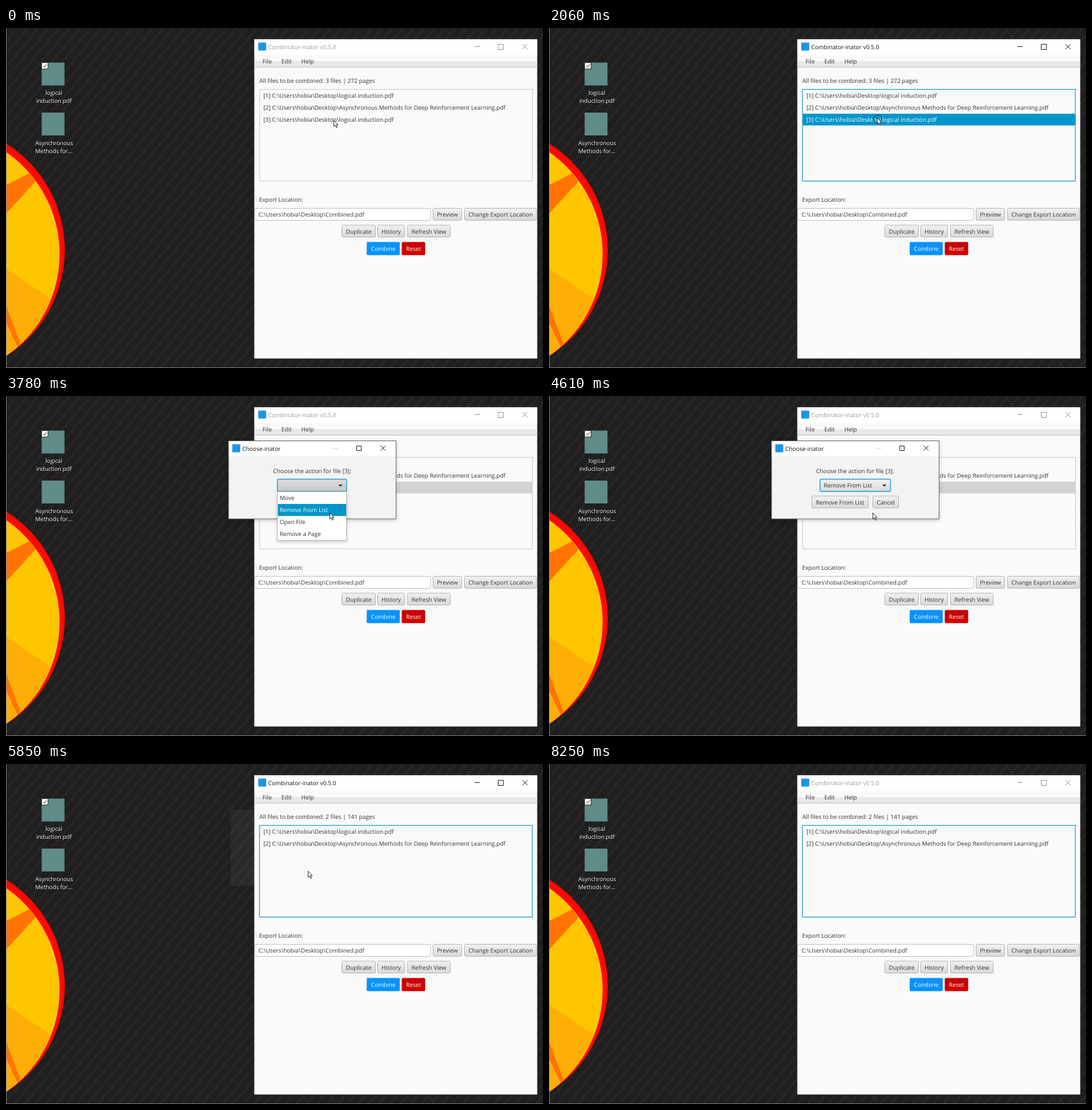
Animation of 941x595 px, one loop 8.35 s. Source, as an HTML page:

```html
<!DOCTYPE html>
<html lang="en">
<head>
<meta charset="utf-8">
<title>File list demo</title>
<style>
  html, body { margin: 0; width: 100%; height: 100%; overflow: hidden; background: #221f20; }
  svg { display: block; width: 941px; height: 595px; }
  text {
    font: 10.2px "Open Sans", "Noto Sans", sans-serif;
    fill: #333; white-space: pre; text-rendering: geometricPrecision;
  }
  .mid { text-anchor: middle; }
  .label { font-size: 10px; fill: #fff; text-anchor: middle; text-shadow: 1px 1px 1px #000; }
  .light { fill: #fff; }
  .line { fill: none; stroke-width: 1; }
  .focus { stroke: #1f9fcf; }
</style>
</head>
<body>
<svg viewBox="0 0 941 595">
  <defs>
    <pattern id="stripes" width="14" height="14" patternUnits="userSpaceOnUse" patternTransform="rotate(40)">
      <rect width="14" height="14" fill="#211e1f"/>
      <rect width="3" height="14" fill="#292627"/>
    </pattern>
    <linearGradient id="face" x2="0" y2="1">
      <stop offset="0" stop-color="#f1f1f1"/><stop offset="1" stop-color="#d9d9d9"/>
    </linearGradient>
    <linearGradient id="pressed" x2="0" y2="1">
      <stop offset="0" stop-color="#dcdcdc"/><stop offset="1" stop-color="#c8c8c8"/>
    </linearGradient>
    <linearGradient id="rule">
      <stop offset="0" stop-color="#ececec" stop-opacity="0"/><stop offset=".5" stop-color="#ececec"/>
      <stop offset="1" stop-color="#ececec" stop-opacity="0"/>
    </linearGradient>
    <filter id="shadow" x="-20%" y="-20%" width="140%" height="140%">
      <feDropShadow dx="0" dy="2" stdDeviation="3" flood-opacity=".22"/>
    </filter>
    <clipPath id="disc"><circle cx="-122.5" cy="395.5" r="216.5"/></clipPath>
  </defs>

  <g id="desktop">
    <rect width="941" height="595" fill="url(#stripes)"/>
    <path class="line" stroke="#353233" d="M404 0L436 40M520 0L536 20M562 0L578 20M770 0L784 20M800 0L814 20M520 579L532 595M566 579L578 595M740 579L752 595M824 579L836 595M890 579L902 595"/>
    <circle cx="-116.4" cy="388" r="219.4" fill="#fe0800"/>
    <g clip-path="url(#disc)">
      <rect y="170" width="110" height="410" fill="#ffc600"/>
      <path fill="#ff7400" d="M0 275L41 254L52 268L0 325Z"/>
      <path fill="#ffae05" d="M0 421L95 485V590H0Z"/>
      <path fill="#ff7400" d="M0 485L27 557L22 562L0 515Z"/>
    </g>
    <path class="line" stroke="#858585" d="M.5 0V594.5H941"/>
    <g fill="#5f8b89"><rect x="62.5" y="60.5" width="40" height="40"/><rect x="62.5" y="148" width="40" height="40"/></g>
    <rect x="62.5" y="60.5" width="11" height="11" fill="#fff" stroke="#333"/>
    <path class="line" stroke="#222" d="M65 66L67.3 68.5L71.5 63.5"/>
    <text class="label" x="84" y="117">logical</text>
    <text class="label" x="84" y="131">induction.pdf</text>
    <text class="label" x="84.5" y="205">Asynchronous</text>
    <text class="label" x="84" y="219">Methods for...</text>
  </g>

  <g id="main">
    <rect x="435" y="19.5" width="496" height="559" fill="#fafafa" stroke="#6d6d6d" stroke-width=".7"/>
    <rect x="435.5" y="20" width="495" height="27" fill="#fff"/>
    <rect x="435.5" y="58" width="495" height="10" fill="#e8e8e8"/>
    <path class="line" stroke="#bdbdbd" d="M435.5 68.5H930.5"/>
    <rect x="442" y="25.5" width="14" height="14" rx="1" fill="#1e96e6"/>
    <g data-on="0-150,2180-5850,8250-8350">
      <text x="459.5" y="37" style="fill:#999">Combinator-inator v0.5.0</text>
      <path class="line" stroke="#8f8f8f" d="M821 32.5H830M862.5 28.5H871.5V37.5H862.5ZM905 28.5L914 37M914 28.5L905 37"/>
    </g>
    <g data-on="150-2180,5850-8250">
      <text x="459.5" y="37" style="fill:#111">Combinator-inator v0.5.0</text>
      <path class="line" stroke="#111" d="M821 32.5H830M862.5 28.5H871.5V37.5H862.5ZM905 28.5L914 37M914 28.5L905 37"/>
    </g>
    <text x="449.5" y="62">File</text><text x="482.5" y="62">Edit</text><text x="517.5" y="62">Help</text>
    <text x="444" y="96" data-on="0-5850">All files to be combined: 3 files | 272 pages</text>
    <text x="444" y="96" data-on="5850-8350">All files to be combined: 2 files | 141 pages</text>

    <rect class="line" x="444.5" y="107.5" width="478" height="160" stroke="#c6c6c6"/>
    <rect x="444.5" y="150" width="478" height="20.5" fill="#0096c9" data-on="150-2180"/>
    <rect x="445" y="150" width="477" height="20.5" fill="#d3d3d3" data-on="2180-5850"/>
    <rect class="line focus" x="444.25" y="107.5" width="478" height="160.5" style="stroke-width:1.3" data-on="150-2180,5850-8350"/>
    <text x="451" y="122">[1] C:\Users\hobia\Desktop\logical induction.pdf</text>
    <text x="451" y="143">[2] C:\Users\hobia\Desktop\Asynchronous Methods for Deep Reinforcement Learning.pdf</text>
    <text x="451" y="164" data-on="0-150,2180-5850">[3] C:\Users\hobia\Desktop\logical induction.pdf</text>
    <text x="451" y="164" class="light" data-on="150-2180">[3] C:\Users\hobia\Desktop\logical induction.pdf</text>

    <text x="443.5" y="304">Export Location:</text>
    <rect x="436" y="315.5" width="308" height="21" rx="2" fill="#fff" stroke="#bcbcbc"/>
    <text x="442.5" y="330">C:\Users\hobia\Desktop\Combined.pdf</text>
    <g data-button="748,315,51,22,Preview"></g>
    <g data-button="803,315,127.5,22,Change Export Location"></g>
    <g data-button="588,344.5,60,22,Duplicate"></g>
    <g data-button="651,344.5,48,22,History"></g>
    <g data-button="703,344.5,76,22,Refresh View"></g>
    <rect x="535" y="370" width="295" height="1" fill="url(#rule)"/>
    <rect x="632" y="374.5" width="58" height="23" rx="2" fill="#0892ff"/>
    <text class="mid light" x="661" y="389.7">Combine</text>
    <rect x="693.5" y="374.5" width="41" height="23" rx="2" fill="#cb0000"/>
    <text class="mid light" x="714" y="389.7">Reset</text>
  </g>

  <rect x="394" y="80" width="41" height="133" fill="#fff" opacity=".05" data-on="5850-6000"/>

  <g id="dialog" data-on="2180-5850">
    <rect x="390" y="78.5" width="293.5" height="136.5" fill="#f3f3f3" stroke="#626262" filter="url(#shadow)"/>
    <rect x="390.5" y="79" width="292.5" height="26" fill="#fff"/>
    <rect x="396.5" y="84.5" width="14" height="14" rx="1" fill="#1e96e6"/>
    <text x="414" y="95.5" style="fill:#111">Choose-inator</text>
    <path class="line" stroke="#ccc" d="M573 91.5H582"/>
    <path class="line" stroke="#111" d="M614.5 87.5H622.5V95.5H614.5ZM656.5 87L665 95.5M665 87L656.5 95.5"/>
    <g data-on="2330-5850">
      <text class="mid" x="536.5" y="134.5">Choose the action for file [3]:</text>
      <g data-on="2330-4490">
        <rect x="475.5" y="145.5" width="121.5" height="21.5" rx="2" fill="url(#face)" data-on="2330-2840"/>
        <rect x="475.5" y="145.5" width="121.5" height="21.5" rx="2" fill="url(#pressed)" data-on="2840-4490"/>
        <rect class="line focus" x="475.5" y="145.5" width="121.5" height="21.5" rx="2" style="stroke-width:1.4"/>
        <path fill="#333" d="M582.5 155H590L586.2 158.8Z"/>
        <g opacity=".4"><g data-button="485,174.5,50,22,Choose"></g></g>
        <g data-button="542,174.5,46.5,22,Cancel"></g>
      </g>
      <g data-on="4490-5850">
        <rect x="475" y="145.5" width="123.5" height="21.5" rx="2" fill="url(#face)" stroke="#b2b2b2"/>
        <rect class="line focus" x="475" y="145.5" width="123.5" height="21.5" rx="2" style="stroke-width:1.4" data-on="4490-5700"/>
        <text x="481.5" y="160">Remove From List</text>
        <path fill="#333" d="M584 155H591.5L587.7 158.8Z"/>
        <g data-button="460,174.5,100,22,Remove From List"></g>
        <g data-on="5700-5850">
          <rect x="460" y="175" width="99.5" height="21.5" rx="2" fill="url(#pressed)"/>
          <rect class="line focus" x="460" y="175" width="99.5" height="21.5" rx="2" style="stroke-width:1.4"/>
          <text class="mid" x="509.7" y="189.5">Remove From List</text>
        </g>
        <g data-button="567,174.5,46,22,Cancel"></g>
      </g>
    </g>
  </g>

  <g id="menu" data-on="2840-4490">
    <rect x="476" y="167.5" width="120.5" height="85" fill="#fff" stroke="#b9b9b9" filter="url(#shadow)"/>
    <g data-item="0,3360-3630,Move"></g>
    <g data-item="1,3630-4490,Remove From List"></g>
    <g data-item="2,,Open File"></g>
    <g data-item="3,,Remove a Page"></g>
  </g>

  <g data-on="0-7970">
    <g id="cursor">
      <circle class="line" cx=".8" cy="2.4" r="7.2" stroke="#222" data-on="150-270,2060-2180,2600-2840,4370-4490,5700-5850"/>
      <path fill="#fff" stroke="#111" stroke-width=".9" d="M.5 .5V11.2L2.9 8.9L4.8 13.3L6.6 12.5L4.7 8.3H8Z"/>
    </g>
  </g>
</svg>
<script>
  const LOOP = 8350;
  const NS = 'http://www.w3.org/2000/svg';

  function add(parent, tag, attrs, text = '') {
    const el = document.createElementNS(NS, tag);
    for (const key in attrs) el.setAttribute(key, attrs[key]);
    el.textContent = text;
    return parent.appendChild(el);
  }

  // Hold each value from its time until the next one.
  function hold(el, keys) {
    const frames = keys.map(([t, props]) => ({ ...props, offset: t / LOOP, easing: 'step-end' }));
    frames.push({ ...keys[keys.length - 1][1], offset: 1 });
    el.animate(frames, { duration: LOOP, iterations: Infinity });
  }

  function showDuring(el, spans) {
    const ranges = spans.split(',').map(span => span.split('-').map(Number));
    const times = [...new Set([0, ...ranges.flat()])].filter(t => t < LOOP).sort((a, b) => a - b);
    const base = el.getAttribute('opacity') || 1;
    hold(el, times.map(t => [t, { opacity: ranges.some(([a, b]) => t >= a && t < b) ? +base : 0 }]));
  }

  document.querySelectorAll('[data-button]').forEach(g => {
    const [x, y, w, h, label] = g.dataset.button.split(',');
    add(g, 'rect', { x: +x + .5, y: +y + .5, width: w - 1, height: h - 1, rx: 2, fill: 'url(#face)', stroke: '#b2b2b2' });
    add(g, 'text', { x: +x + w / 2, y: +y + 15, class: 'mid' }, label);
  });

  document.querySelectorAll('[data-item]').forEach(g => {
    const [row, hover, label] = g.dataset.item.split(',');
    const y = 168 + row * 20.9;
    const pos = { x: 479.5, y: y + 14.3 };
    add(g, 'text', pos, label);
    if (!hover) return;
    const lit = add(g, 'g', { 'data-on': hover });
    add(lit, 'rect', { x: 476.5, y, width: 119.5, height: 21, fill: '#0096c9' });
    add(lit, 'text', { ...pos, class: 'light' }, label);
  });

  document.querySelectorAll('[data-on]').forEach(el => showDuring(el, el.dataset.on));

  const path = [
    [0, 574, 161], [1230, 617, 160], [1350, 602, 157], [1500, 575, 157],
    [2450, 574, 153], [3240, 572, 164], [3360, 570, 174], [3510, 569, 184],
    [3630, 567, 197], [3780, 567, 204], [4760, 560, 203], [4880, 552, 200],
    [5000, 544, 197], [5150, 536, 192], [5270, 529, 187], [6150, 545, 200],
    [6270, 563, 215], [6420, 624, 251], [6570, 637, 259], [7160, 680, 284],
    [7310, 722, 350], [7430, 765, 420], [7550, 812, 487], [7670, 854, 547],
    [7820, 861, 576]
  ];
  hold(document.getElementById('cursor'),
    path.map(([t, x, y]) => [t, { transform: `translate(${x}px, ${y}px)` }]));
</script>
</body>
</html>
```
